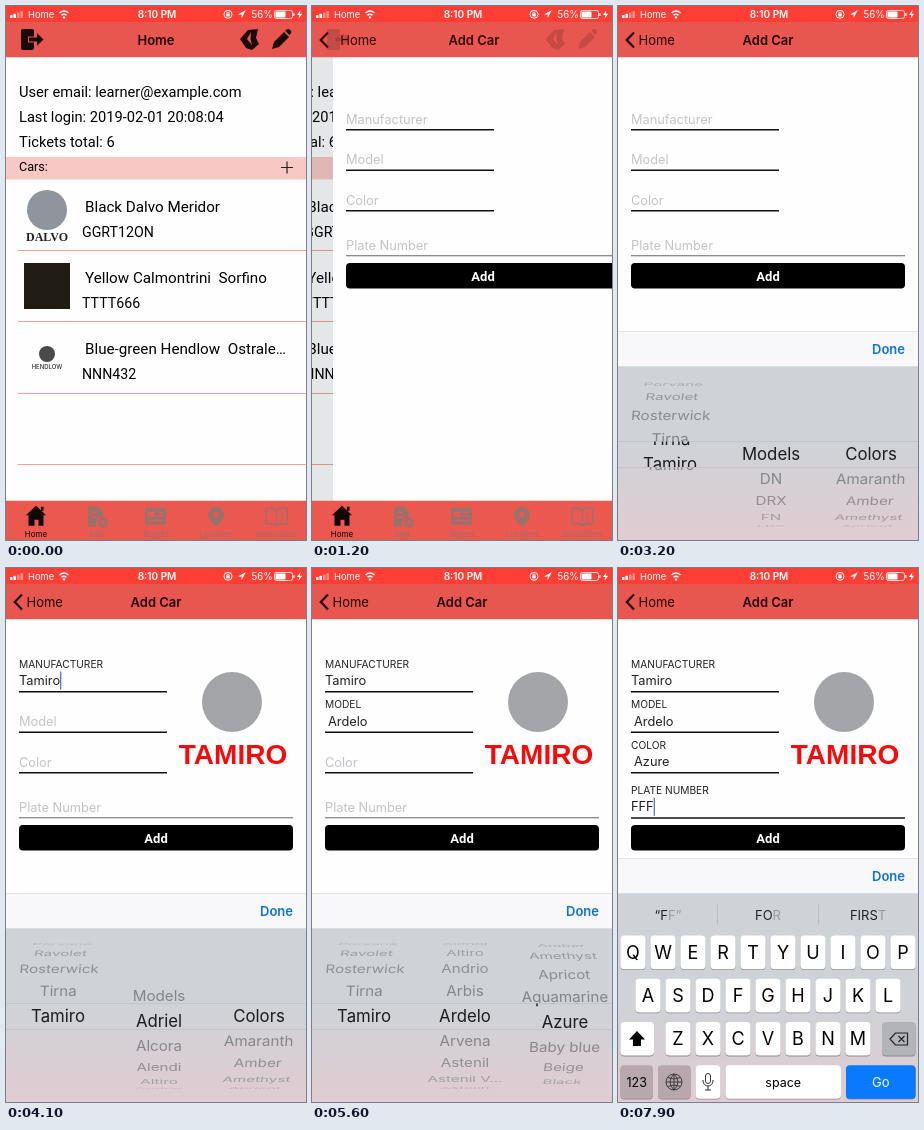
Recreate the animation shown at these times as an HTML page with a canvas. Size 300 by 534 pixels, loop 8 s.

```html
<!DOCTYPE html>
<html lang="en">
<head>
<meta charset="utf-8">
<title>Add Car</title>
<style>
html, body { margin: 0; width: 100%; height: 100%; overflow: hidden; background: #fff; }
canvas { display: block; width: 100vw; height: 100vh; }
</style>
</head>
<body>
<canvas id="stage"></canvas>
<script>
const W = 300, H = 534, LOOP = 8000, STEP = 100;
const NAV = 51.2, TAB = 494.8, BAR = 35.2;
const UI = 'Inter, "Liberation Sans", sans-serif', DIN = 'Roboto, sans-serif';
const SERIF = '"Liberation Serif", serif', BLOCK = '"Liberation Sans", sans-serif';
const canvas = document.getElementById('stage'), c = canvas.getContext('2d');
const dpr = window.devicePixelRatio || 1;
canvas.width = W * dpr;
canvas.height = H * dpr;

const brands = ('Brand Avilo Almodravo Arvu Belcor Brenzo Cadrel Dorvane Fenwol Galdor Hestra Kelmar Lundra ' +
  'Mavoni Nerida Orvel Pelgrin Porvane Ravolet Rosterwick Tirna Tamiro').split(' ');
const firstModels = ['Models', 'DN', 'DRX', 'FN', 'LRX'];
const models = ['Models', 'Adriel', 'Alcora', 'Alendi', 'Altiro', 'Andrio', 'Arbis', 'Ardelo',
  'Arvena', 'Astenil', 'Astenil V...', 'Astolin'];
const colors = ['Colors', 'Amaranth', 'Amber', 'Amethyst', 'Apricot', 'Aquamarine', 'Azure',
  'Baby blue', 'Beige', 'Black'];
const last = brands.length - 1;

// Tracks of [time, value], linear between points.
const track = {
  push: [[900, 0], [1000, .2], [1100, .72], [1200, .93], [1300, .985], [1400, .997], [1500, 1]],
  panel: [[1800, 534], [1900, 470], [2000, 395], [2100, 344], [2200, 330], [2300, 325],
    [6200, 325], [6300, 312], [6400, 293], [6500, 290]],
  brand: [[2300, 0], [2500, 2], [2700, 6], [2900, 13], [3100, last - 1.6], [3200, last - .4],
    [3300, last - .1], [3400, last]],
  model: [[4000, 0], [4100, .8], [4300, 4.5], [4500, 6.8], [4600, 7]],
  color: [[4700, 0], [4900, 2], [5000, 2], [5300, 5], [5400, 5], [5500, 5.5], [5700, 6]]
};

function at(points, t) {
  if (t <= points[0][0]) return points[0][1];
  for (let i = 1; i < points.length; i++) {
    const [a, u] = points[i - 1], [b, v] = points[i];
    if (t <= b) return u + (v - u) * (t - a) / (b - a);
  }
  return points[points.length - 1][1];
}
const clamp = v => Math.max(0, Math.min(1, v));

function scoped(draw, alpha = 1) {
  c.save();
  c.globalAlpha *= alpha;
  draw();
  c.restore();
}
// y is the middle of the capital letters
function text(s, x, y, size, color = '#000', align = 'left', weight = 400, family = UI) {
  c.font = `${weight} ${size}px ${family}`;
  c.textAlign = align;
  c.fillStyle = color;
  c.fillText(s, x, y + size * .36);
}
function box(x, y, w, h, color, r = 0) {
  c.fillStyle = color;
  c.beginPath();
  c.roundRect(x, y, w, h, r);
  c.fill();
}
function frame(x, y, w, h, r, color, width = 1) {
  c.strokeStyle = color;
  c.lineWidth = width;
  c.beginPath();
  c.roundRect(x, y, w, h, r);
  c.stroke();
}
function disc(x, y, r, color) {
  c.fillStyle = color;
  c.beginPath();
  c.arc(x, y, r, 0, 7);
  c.fill();
}
function fill(d, color) {
  c.fillStyle = color;
  c.fill(new Path2D(d), 'evenodd');
}
function line(d, color, width = 1) {
  c.strokeStyle = color;
  c.lineWidth = width;
  c.stroke(new Path2D(d));
}
function fade(y0, y1, from, to) {
  const g = c.createLinearGradient(0, y0, 0, y1);
  g.addColorStop(0, from);
  g.addColorStop(1, to);
  return g;
}

function homePage() {
  box(0, 51, W, 444, '#fefefe');
  ['User email: learner@example.com', 'Last login: 2019-02-01 20:08:04', 'Tickets total: 6']
    .forEach((s, i) => text(s, 13, 86 + i * 25, 14.65, '#000', 'left', 400, DIN));
  box(0, 151, W, 22.5, '#f8c8c5');
  text('Cars:', 13, 160, 12.6, '#000', 'left', 400, DIN);
  line('M275 161.5h12M281 155.5v12', '#222', 1.2);
  [['Black Dalvo Meridor', 'GGRT12ON'], ['Yellow Calmontrini  Sorfino', 'TTTT666'],
    ['Blue-green Hendlow  Ostrale…', 'NNN432']].forEach(([name, plate], i) => {
    const y = 201 + i * 71;
    text(name, 79, y, 15.2, '#000', 'left', 400, DIN);
    text(plate, 76, y + 25, 14.2, '#000', 'left', 400, DIN);
  });
  for (let i = 0; i < 4; i++) box(12, Math.round(244 + i * 71.3), 288, 1, '#f59d96');
  disc(41, 204, 20, '#90959b');
  text('DALVO', 41, 230.5, 12, '#222', 'center', 700, SERIF);
  box(18, 257, 46, 46, '#211d14');
  disc(41, 348, 8, '#4a4a4a');
  text('HENDLOW', 41, 361, 6, '#333', 'center', 500);
}

function field(f, t) {
  const p = clamp((t - f.start + 100) / 300);
  if (p > 0) {
    scoped(() => text(f.label.toUpperCase(), 13, f.y - 17 + 8 * (1 - p), 10.2, '#222'), p);
    text(f.value(t), f.x, f.y - .5, 12.8, '#222');
  } else text(f.label, 13, f.y, 12.8, '#c4c4c8');
  const dark = t >= f.focus;
  box(13, f.y + 10, f.end - 13, dark ? 1.5 : 1, dark ? '#111' : '#666');
}
const plate = t => t < 7300 ? 'F' : t < 7800 ? 'FF' : 'FFF';
const fields = [
  { label: 'Manufacturer', y: 113, x: 13, end: 161, focus: 0, start: 3600, value: () => 'Tamiro' },
  { label: 'Model', y: 153.5, x: 16, end: 161, focus: 0, start: 4500, value: () => 'Ardelo' },
  { label: 'Color', y: 194, x: 16, end: 161, focus: 0, start: 5700, value: () => 'Azure' },
  { label: 'Plate Number', y: 239.3, x: 13, end: 287, focus: 6300, start: 7000, value: plate }
];

function cursor(t) {
  const onPlate = t >= 6300;
  if (t < 1900 || (onPlate ? (t - 6400) % 1000 >= 600 : (t + 350) % 1000 >= 550)) return;
  const f = fields[onPlate ? 3 : 0];
  c.font = `12.8px ${UI}`;
  const w = t >= f.start ? c.measureText(f.value(t)).width : 0;
  box(13 + w, f.y - 9.5, 1.2, 18, '#4a6cb0');
}

function formPage(t) {
  box(0, 51, W, 483, '#fefefe');
  fields.forEach(f => field(f, t));
  cursor(t);
  box(13, 257, 274, 25.5, '#000', 4);
  text('Add', 150, 270, 13, '#fff', 'center', 700, DIN);
  if (t >= 4100) {
    disc(226, 134, 30, '#a3a5a8');
    text('TAMIRO', 227, 186, 28, '#f90a0a', 'center', 700, BLOCK);
  }
}

function statusBar() {
  [3, 4.2, 5.6, 7].forEach((h, i) => box(4 + i * 3.5, 12 - h, 2.5, h, i < 2 ? '#fff' : '#ffffff70', .5));
  text('Home', 22, 8.3, 9.3, '#fff');
  line('M53.5 7q4.5-4 9 0M55.5 9.3q2.5-2.2 5 0', '#fff', 1.5);
  disc(58, 11.4, 1.2, '#fff');
  text('8:10 PM', 151, 8.3, 10, '#fff', 'center', 600);
  line('M226 8.3a4 4 0 1 1-8 0a4 4 0 1 1 8 0', '#fff');
  box(220.3, 7.6, 3.4, 2.8, '#fff');
  line('M221 8v-1.2a1 1 0 0 1 2 0V8', '#fff', .7);
  fill('M240 4L232 8.4h3.6v3.6z', '#fff');
  text('56%', 245.5, 8.3, 9.7, '#fff');
  frame(268.5, 4.5, 18, 8, 2, '#fff', .8);
  box(269.5, 5.5, 10, 6, '#fff', 1);
  box(287.3, 7, 1.2, 3, '#fff');
  fill('M294.5 4l-3.5 5h2.4l-1 4 3.8-5.2h-2.4z', '#fff');
}

function navBar(p) {
  const bg = '#e8574f', ink = '#1a0a09', arrow = 'M23 31.5h8v-4.3l6.5 6.3-6.5 6.3v-4.3h-8z';
  box(0, 0, W, NAV, bg);
  box(0, 0, W, 16, '#ff3f36');
  if (p < 1) scoped(() => {
    box(15, 23, 13, 21, ink, 2);
    line(arrow, bg, 2);
    fill(arrow, ink);
    fill('M242 24L252 23 250 32 253 38 246 44 240 42 234 33zM245 26l-4 7 5 6-1.500-6z', ink);
    fill('M266 43l2-7L278 26l5 5L273 41zM279.3 24.7l1.7-1.500q1.500-.8 2.700.4l1.300 1.500q.8 1.200-.2 2.300l-1.500 1.500z', ink);
  }, 1 - p * .9);
  scoped(() => text('Home', 150 - 111 * p, 34, 13, '#200', 'center', 600), clamp(1 - p * 1.3));
  if (p > 0) scoped(() => {
    line('M16 26.5L8.8 34l7.2 7.5', ink, 2.2);
    text('Home', 131 - 110.5 * p, 34, 13, '#200');
    text('Add Car', 150 + 170 * (1 - p), 34, 13, '#200', 'center', 600);
  }, p);
  statusBar();
}

function tabBar() {
  const bg = '#ea584f', gray = '#99716d', ink = '#120504';
  box(0, TAB, W, H - TAB, bg);
  scoped(() => {
    c.translate(0, .8);
    fill('M30 499l10 9.5h-2.5V519h-5v-6h-4v6H22.5v-10.5H20zM35 500h2.5v4H35z', ink);
    fill('M82 500h10l5 5v5.5a6 6 0 0 0-6 9.5h-9zM85 505v1.5h6V505zM85 509.5v1.5h6v-1.5z', gray);
    disc(97, 516, 4.8, gray);
    line('M94 516h6M97 513v6', bg, 1.3);
    fill('M139 501h21v17h-21zM141.5 505v5h7v-5zM151 505v1.5h6.5V505zM151 508.5v1.5h6.5v-1.5zM141.5 513v1.5h16V513z', gray);
    fill('M210 500a8 8 0 0 1 8 8q0 5-8 12q-8-7-8-12a8 8 0 0 1 8-8zM210 505a3 3 0 1 0 .01 0z', gray);
    line('M270.5 503q-5-3-10.5-1.5V517q6-1 10.5 1.5q4.5-2.5 10.5-1.5V501.5q-5.5-1.5-10.5 1.5zV518M275.5 506v5M275.5 513v1.5', gray, 1.5);
  });
  ['Home', 'Add', 'Report', 'Location', 'Instruction'].forEach((s, i) =>
    text(s, 30 + i * 60, 528, 8, i ? gray : ink, 'center'));
}

// Wheel of rows 20 degrees apart on a cylinder of radius 73
function wheel(rows, pos, x, mid, side) {
  const each = draw => rows.forEach((s, i) => {
    const a = (i - pos) * Math.PI / 9;
    if (Math.abs(a) < 1.5) draw(s, a, mid + 73 * Math.sin(a));
  });
  const clip = (bands, draw) => scoped(() => {
    c.beginPath();
    bands.forEach(([y, h]) => c.rect(0, y, W, h));
    c.clip();
    each(draw);
  });
  clip([[mid - 80, 67], [mid + 13, 80]], (s, a, y) => scoped(() => {
    c.translate(x - side * 5 * (1 - Math.cos(a)), y);
    c.transform(1, 0, -side * .12 * Math.sin(a), Math.cos(a), 0, 0);
    text(s, 0, 0, 15.2, '#5c5e63', 'center');
  }, .68 * Math.cos(a) ** .6));
  clip([[mid - 13, 26]], (s, a, y) => text(s, x, y, 16.8, '#1c1c1e', 'center'));
}

function picker(top, t) {
  const mid = top + 123;
  wheel(brands, at(track.brand, t), 52, mid, -1);
  wheel(t < 3600 ? firstModels : models, at(track.model, t), 153, mid, 0);
  wheel(colors, at(track.color, t), 253, mid, 1);
  box(0, mid - 13, W, .6, '#b6b9be');
  box(0, mid + 13, W, .6, '#b6b9be');
}

// Letters past `solid` are still fading in.
function hint(s, x, y, solid = s.length) {
  c.font = `400 13px ${UI}`;
  let left = x - c.measureText(s).width / 2;
  [...s].forEach((ch, i) => {
    scoped(() => text(ch, left, y, 13, '#222'), i < solid ? 1 : .3);
    left += c.measureText(ch).width;
  });
}
function hints(t, y) {
  if (t < 7100) {
    if (t < 6600) scoped(() => text('“co', 30, y, 13, '#222'), .45);
    ['I', 'HI', 'WE'].forEach((s, i) => hint(s, 50 + i * 100.3, y));
  } else {
    const changing = t >= 7800;
    hint(t < 7400 ? '“F”' : '“FF”', 50, y, changing ? 2 : 4);
    hint('FOR', 150, y, changing ? 2 : 3);
    hint('FIRST', 250, y, changing ? 4 : 5);
  }
}

function key(x, y, w, label, color = '#fff', size = 18, ink = '#000') {
  box(x, y + .8, w, 33.6, '#8a8b90', 4);
  box(x, y, w, 33.6, color, 4);
  text(label, x + w / 2, y + 16.8, size, ink, 'center');
}
function keyboard(top, t) {
  const gray = '#b9a7ae', rowY = r => 367.6 + r * 43.2;
  scoped(() => {
    c.translate(0, top - 290);
    hints(t, 347);
    box(99, 337, .8, 20, '#bbbfc5');
    box(200, 337, .8, 20, '#bbbfc5');
    ['QWERTYUIOP', 'ASDFGHJKL', 'ZXCVBNM'].forEach((row, r) =>
      [...row].forEach((ch, i) => key([2.4, 17.4, 47.4][r] + i * 30, rowY(r), 25.2, ch)));
    key(2.4, rowY(2), 33.6, '');
    key(264, rowY(2), 33.6, '', '#b3b3ba');
    key(2.4, rowY(3), 32.5, '123', gray, 12.5);
    key(40, rowY(3), 32.5, '', gray);
    key(77.5, rowY(3), 25, '');
    key(107.5, rowY(3), 115.5, 'space', '#fff', 12.5);
    key(228, rowY(3), 69.6, 'Go', '#087aff', 13, '#fff');
    fill('M19 463l8 8.5h-4v6.5h-8v-6.5h-4z', '#000');
    line('M272 471l5.5-6h12v12h-12zM280.5 468l6 6M286.5 468l-6 6', '#222', 1.2);
    line('M64 514a8 8 0 1 1-16 0a8 8 0 1 1 16 0M56 506v16M48 514h16M56 506q-8 8 0 16M56 506q8 8 0 16M49.5 509.5q6.5 3 13 0M49.5 518.5q6.5-3 13 0', '#333', .9);
    frame(87.5, 505.5, 5, 10, 2.5, '#333');
    line('M85 512v1a5 5 0 0 0 10 0v-1M90 518v4M87 522h6', '#333');
  });
}

function panel(t) {
  const top = at(track.panel, t);
  if (top >= H) return;
  box(0, top, W, H - top, fade(440, H, '#cfd2d7', '#e0ccd1'));
  box(0, top, W, BAR, '#f8f8fa');
  box(0, top, W, .6, '#d0d0d4');
  text('Done', 287, top + 18.3, 13, '#0b72d9', 'right', 600);
  (t < 6300 ? picker : keyboard)(top, t);
}

function render(t) {
  c.setTransform(canvas.width / W, 0, 0, canvas.height / H, 0, 0);
  const p = at(track.push, t);
  if (p < 1) scoped(() => {
    c.translate(-90 * p, 0);
    homePage();
    box(0, 51, W + 90, 444, `rgba(0, 30, 30, ${.11 * p})`);
  });
  if (p > 0) scoped(() => {
    c.translate(W * (1 - p), 0);
    formPage(t);
  });
  tabBar();
  navBar(p);
  panel(t);
}

let begin;
function tick(now) {
  begin ??= now;
  render(Math.floor((now - begin) % LOOP / STEP) * STEP);
  requestAnimationFrame(tick);
}
requestAnimationFrame(tick);
</script>
</body>
</html>
```
